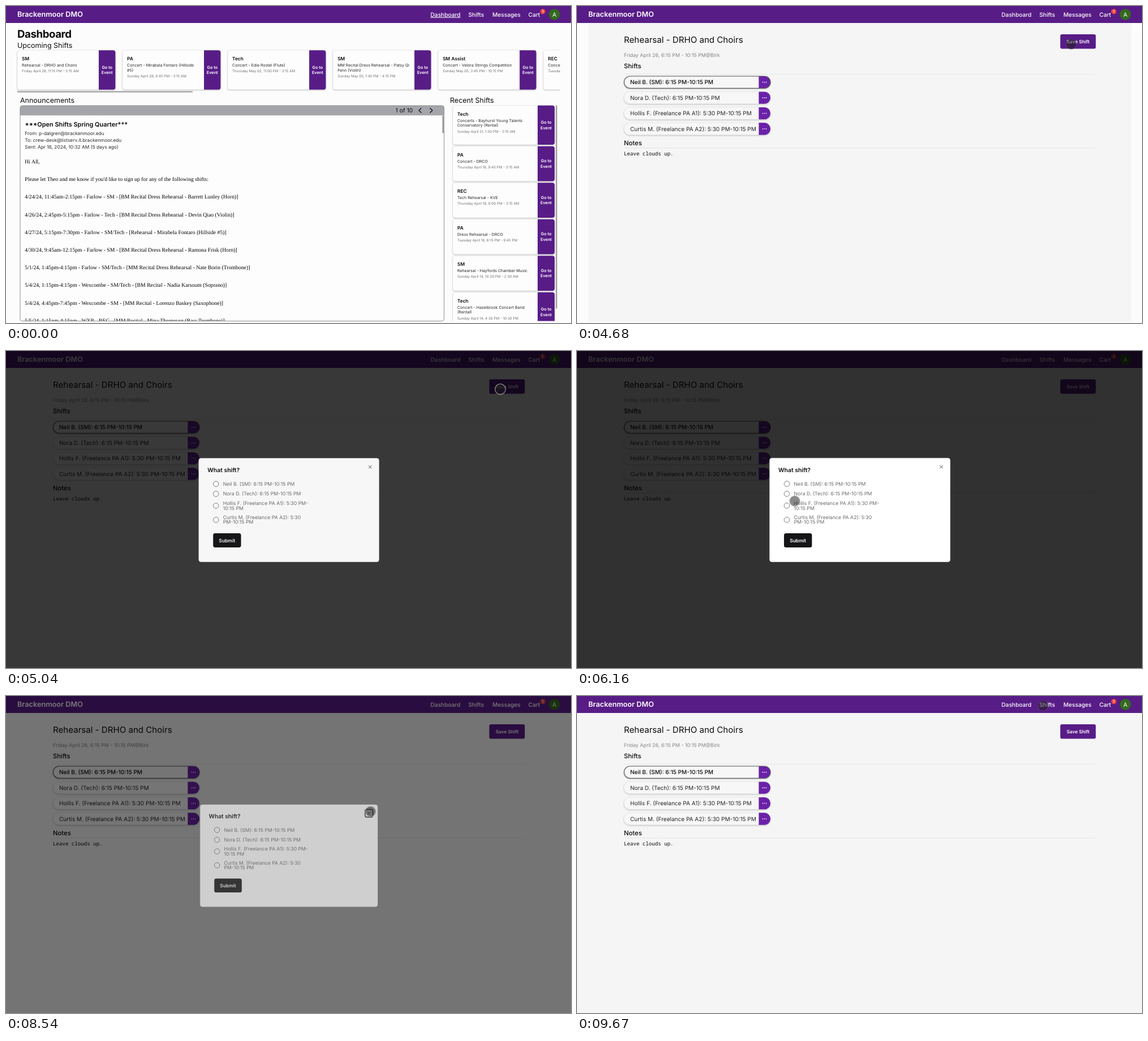
Write an HTML page that moves like this. It is 999 px wide and 560 px high and loops after 9690 ms.

```html
<!DOCTYPE html>
<html lang="en">
<head>
<meta charset="utf-8">
<title>Shift dashboard</title>
<style>
html, body { margin: 0; width: 100%; height: 100%; overflow: hidden; background: #fcfcfc; }
svg { display: block; width: 999px; height: 560px; }
text { font-family: Inter, Roboto, sans-serif; text-rendering: geometricPrecision; white-space: pre; }
.serif { font-family: "Liberation Serif", "Noto Serif", serif; }
.mono { font-family: "Noto Sans Mono", "DejaVu Sans Mono", monospace; }
.mid { text-anchor: middle; }
.under { text-decoration: underline; }
.card { fill: #fdfdfd; stroke: #e4e4e7; stroke-width: .6; filter: drop-shadow(0 1px 1px rgba(0,0,0,.24)); }
.pill { fill: #f7f7f7; stroke: #e2e2e4; stroke-width: .6; filter: drop-shadow(0 1px 1.2px rgba(0,0,0,.22)); }
</style>
</head>
<body>
<svg id="stage" viewBox="0 0 999 560" xmlns="http://www.w3.org/2000/svg"></svg>
<script>
const LOOP = 9690;
const PURPLE = '#581c87', INK = '#0c0c0f', GRAY = '#71717a';

// Drawing helpers
const text = (x, y, s, size, weight = 400, fill = INK, cls = '') =>
  `<text x="${x}" y="${y}" font-size="${size}" font-weight="${weight}" fill="${fill}" class="${cls}">${s}</text>`;
const rect = (x, y, w, h, fill, r = 0, extra = '') =>
  `<rect x="${x}" y="${y}" width="${w}" height="${h}" rx="${r}" fill="${fill}" ${extra}/>`;
const circle = (x, y, r, fill, extra = '') =>
  `<circle cx="${x}" cy="${y}" r="${r}" fill="${fill}" ${extra}/>`;
const line = (d, color, width) =>
  `<path d="${d}" fill="none" stroke="${color}" stroke-width="${width}" stroke-linecap="round" stroke-linejoin="round"/>`;
const rightTab = (x, y, w, h, r, fill) =>
  `<path d="M${x} ${y}h${w - r}a${r} ${r} 0 0 1 ${r} ${r}v${h - 2 * r}a${r} ${r} 0 0 1 ${-r} ${r}h${r - w}z" fill="${fill}"/>`;
const clip = (id, x, y, w, h, body) =>
  `<clipPath id="${id}">${rect(x, y, w, h, '#000')}</clipPath><g clip-path="url(#${id})">${body}</g>`;

function card(x, y, w, h, tab, [role, lines, when]) {
  const mid = y + h / 2, tx = x + w - tab / 2;
  const rows = lines.split('|');
  return `<rect class="card" x="${x}" y="${y}" width="${w}" height="${h}" rx="4"/>` +
    rightTab(x + w - tab, y, tab, h, 4, PURPLE) +
    text(x + 8, y + 17.8, role, 8.33, 600) +
    rows.map((s, i) => text(x + 8, y + 28.8 + 8.8 * i, s, 7, 400, '#27272a')).join('') +
    text(x + 8, y + 29.8 + 9 * rows.length, when, 6.24, 400, GRAY) +
    text(tx, mid - 2.2, 'Go to', 7.28, 600, '#fff', 'mid') +
    text(tx, mid + 7.3, 'Event', 7.28, 600, '#fff', 'mid');
}

const upcoming = [
  ['SM', 'Rehearsal - DRHO and Choirs', 'Friday April 26, 11:15 PM - 3:15 AM'],
  ['PA', 'Concert - Mirabela Fontaro (Hillside|#5)', 'Sunday April 28, 8:45 PM - 3:15 AM'],
  ['Tech', 'Concert - Edie Rostel (Flute)', 'Thursday May 02, 11:00 PM - 3:15 AM'],
  ['SM', 'MM Recital Dress Rehearsal - Patsy Qi|Fenn (Violin)', 'Sunday May 05, 1:45 PM - 4:15 PM'],
  ['SM Assist', 'Concert - Velora Strings Competition', 'Sunday May 05, 3:45 PM - 10:15 PM'],
  ['REC', 'Concert - Velora Strings', 'Tuesday May 07, 9:45 PM - 3:15 AM']
];
const recent = [
  ['Tech', 'Concerts - Bayhurst Young Talents|Conservatory (Rental)', 'Sunday April 21, 1:30 PM - 3:15 AM'],
  ['PA', 'Concert - DRCO', 'Thursday April 18, 9:45 PM - 3:15 AM'],
  ['REC', 'Tech Rehearsal - KVE', 'Thursday April 18, 9:00 PM - 3:15 AM'],
  ['PA', 'Dress Rehearsal - DRCO', 'Tuesday April 16, 6:15 PM - 9:45 PM'],
  ['SM', 'Rehearsal - Hayfords Chamber Music', 'Sunday April 14, 10:30 PM - 2:30 AM'],
  ['Tech', 'Concert - Hazelbrook Concert Band|(Rental)', 'Sunday April 14, 4:30 PM - 10:30 PM']
];
const mail = [
  'Hi All,',
  "Please let Theo and me know if you'd like to sign up for any of the following shifts:",
  '4/24/24, 11:45am-2:15pm - Farlow - SM - [BM Recital Dress Rehearsal - Barrett Lunley (Horn)]',
  '4/26/24, 2:45pm-5:15pm - Farlow - Tech - [BM Recital Dress Rehearsal - Devin Qiao (Violin)]',
  '4/27/24, 5:15pm-7:30pm - Farlow - SM/Tech - [Rehearsal - Mirabela Fontaro (Hillside #5)]',
  '4/30/24, 9:45am-12:15pm - Farlow - SM - [BM Recital Dress Rehearsal - Ramona Frisk (Horn)]',
  '5/1/24, 1:45pm-4:15pm - Farlow - SM/Tech - [MM Recital Dress Rehearsal - Nate Borin (Trombone)]',
  '5/4/24, 1:15pm-4:15pm - Wexcombe - SM/Tech - [BM Recital - Nadia Karsoum (Soprano)]',
  '5/4/24, 4:45pm-7:45pm - Wexcombe - SM - [MM Recital - Lorenzo Baskey (Saxophone)]',
  '5/5/24, 1:15pm-4:15pm - WXR - REC - [MM Recital - Mina Thorneson (Bass Trombone)]'
];
const crew = [
  'Neil B. (SM): 6:15 PM-10:15 PM',
  'Nora D. (Tech): 6:15 PM-10:15 PM',
  'Hollis F. (Freelance PA A1): 5:30 PM-10:15 PM',
  'Curtis M. (Freelance PA A2): 5:30 PM-10:15 PM'
];

function header() {
  return rect(0, 0, 999, 30, PURPLE) +
    text(20, 18.8, 'Brackenmoor DMO', 12.7, 600, '#fff') +
    `<g id="homeLink">${text(750.5, 18.8, 'Dashboard', 10.2, 500, '#fff')}</g>` +
    text(817.5, 18.8, 'Shifts', 10.2, 500, '#fff') +
    text(860, 18.8, 'Messages', 10.2, 500, '#fff') +
    text(923.5, 18.8, 'Cart', 10.2, 500, '#fff') +
    circle(949.2, 9.8, 4.6, '#ef4444') + text(949.2, 12.2, '1', 6.5, 600, '#fff', 'mid') +
    circle(969.6, 14.8, 9.9, '#33691e') + text(969.6, 18.6, 'A', 10.4, 400, '#fff', 'mid');
}

function dashboard() {
  let top = 175.7;
  const list = recent.map(r => {
    const h = r[1].includes('|') ? 69.2 : 61.6;
    const out = card(790, top, 180, h, 30, r);
    top += h + 2.9;
    return out;
  }).join('');
  return rect(0, 30, 999, 530, '#fcfcfc') +
    `<g letter-spacing="-.47">${text(20, 55.6, 'Dashboard', 18.73, 700)}</g>` +
    text(20, 73.7, 'Upcoming Shifts', 12.49) +
    clip('rowClip', 18, 76, 962, 74, upcoming.map((s, i) => card(20 + 186.05 * i, 78.2, 173.4, 69.6, 29.4, s)).join('')) +
    rect(20, 150.4, 310, 2.2, '#a0a0a0') +
    text(25, 171, 'Announcements', 12.49) + text(785, 171, 'Recent Shifts', 12.49) +
    rect(25, 176, 749.6, 380.6, '#fdfdfd', 4) +
    '<path d="M25 193.3v-13.3a4 4 0 0 1 4-4h741.6a4 4 0 0 1 4 4v13.3z" fill="#a4a4ab"/>' +
    rect(25, 176, 749.6, 380.6, 'none', 4, 'stroke="#85858a" stroke-width=".9"') +
    text(688.5, 188.1, '1 of 10', 10.4) +
    line('M734 180.7l-4 3.8 4 3.8M750 180.7l4 3.8-4 3.8', INK, 1.3) +
    rect(771.4, 193.5, 2.6, 31, '#a0a0a0') +
    text(33.5, 213, '***Open Shifts Spring Quarter***', 10.95, 600) +
    text(33.3, 227.5, 'From: p-dalgren@brackenmoor.edu', 8.33, 400, '#2c2c31') +
    text(33.3, 240, 'To: crew-desk@listserv.it.brackenmoor.edu', 8.33, 400, '#2c2c31') +
    text(33.3, 252.4, 'Sent: Apr 18, 2024, 10:32 AM (5 days ago)', 8.33, 400, '#2c2c31') +
    clip('mailClip', 26, 194, 745, 362, mail.map((s, i) => text(33.3, 278 + 31.2 * i, s, 9.71, 400, '#000', 'serif')).join('')) +
    clip('listClip', 785, 175, 195, 381.6, list) +
    rect(972, 175.5, 2.5, 359, '#a0a0a0');
}

function crewRow(s, i) {
  const y = 124 + 27.45 * i, h = 21.4;
  const dots = [-3, 0, 3].map(d => circle(331.5 + d, y + h / 2, .85, '#fff')).join('');
  return `<rect class="pill" x="83" y="${y}" width="259" height="${h}" rx="10.7"/>` +
    rightTab(321.4, y, 20.6, h, 10.5, '#6b21a8') + dots +
    (i ? '' : rect(83.3, y, 258.8, h, 'none', 10.7, 'stroke="#5c5c60" stroke-width="1.2"')) +
    text(94, y + 14.4, s, 10.05, i ? 400 : 500, i ? '#26262a' : INK);
}

function eventPage() {
  return rect(0, 30, 999, 530, '#f5f5f5') +
    `<g id="edges">${rect(0, 30, 20, 530, '#fcfcfc')}${rect(980, 30, 19, 530, '#fcfcfc')}${rect(0, 558, 999, 2, '#fcfcfc')}</g>` +
    text(83, 65.2, 'Rehearsal - DRHO and Choirs', 15.1) +
    text(83, 89.8, 'Friday April 26, 6:15 PM - 10:15 PM@Birk', 8.9, 400, '#85858a') +
    rect(854.5, 50, 62.8, 25.4, PURPLE, 3) +
    text(885.9, 65.9, 'Save Shift', 8.33, 600, '#fff', 'mid') +
    text(83, 110.2, 'Shifts', 11.3, 500) + rect(83, 119.9, 834, .9, '#e4e4e7') +
    crew.map(crewRow).join('') +
    text(83, 245.5, 'Notes', 11.3, 500) + rect(83, 250.3, 834, .9, '#e4e4e7') +
    text(83, 264.3, 'Leave clouds up.', 9.15, 400, INK, 'mono');
}

function dialog() {
  const radios = [234.6, 252.2, 273.2, 298.2];
  const labels = [
    [237.8, crew[0]], [255.3, crew[1]],
    [271.7, 'Hollis F. (Freelance PA A1): 5:30 PM-'], [280.5, '10:15 PM'],
    [296.9, 'Curtis M. (Freelance PA A2): 5:30'], [305.4, 'PM-10:15 PM']
  ];
  return rect(340.6, 189.2, 319.2, 183.3, '#fff', 4, 'stroke="#e4e4e7" stroke-width=".6"') +
    text(356, 213.9, 'What shift?', 10.4, 600) +
    line('M641.6 202.1l5 5m0-5l-5 5', '#505055', 1) +
    rect(637.2, 197.6, 14, 14, 'none', 3, 'id="ring" stroke="#18181b" stroke-width="1.5"') +
    radios.map(y => circle(371, y, 4.8, 'none', 'stroke="#6f6f74" stroke-width=".9"')).join('') +
    labels.map(([y, s]) => text(383.5, y, s, 8.75, 400, '#6b6b70')).join('') +
    rect(366, 322, 49.4, 25, '#151517', 3.5) +
    text(390.6, 337.7, 'Submit', 8.5, 600, '#fff', 'mid');
}

const $ = id => document.getElementById(id);
$('stage').innerHTML =
  `<g id="home">${dashboard()}</g><g id="event">${eventPage()}</g>${header()}` +
  `<rect id="shade" width="999" height="560"/><g id="dialog">${dialog()}</g>` +
  circle(0, 0, 9.3, 'rgba(30,30,30,.52)', 'id="dot" stroke="#c4c4c4" stroke-width="1.3"');

// Pointer moves: start, end, then [progress, x, y] stops
const moves = [
  [1120, 1720, [0, 512, 552], [.45, 375, 350], [1, 178, 121]],
  [3590, 4250, [0, 178, 121], [.5, 480, 94], [1, 815, 75]],
  [4500, 4680, [0, 815, 75], [1, 874, 67.5]],
  [5090, 5870, [0, 874, 67.5], [.5, 640, 180], [1, 405, 278]],
  [5920, 6160, [0, 405, 278], [1, 385, 265]],
  [6900, 7200, [0, 385, 265], [.5, 381, 300], [1, 386, 330]],
  [7570, 8050, [0, 386, 330], [.417, 640, 226], [.7, 651, 193], [1, 637, 206]],
  [8230, 8350, [0, 637, 206], [1, 644.5, 204]],
  [8710, 9490, [0, 644.5, 204], [.5, 738, 100], [1, 815, 14]],
  [9550, 9670, [0, 815, 14], [1, 824, 17]]
];
const TICK = 60;
const clamp = v => Math.max(0, Math.min(1, v));
const smooth = p => p * p * (3 - 2 * p);

function pointer(t) {
  const [start, end, ...stops] = moves.filter(m => t >= m[0]).pop() || moves[0];
  const steps = Math.round((end - start) / TICK) + 1;
  const p = smooth(clamp((Math.floor((t - start) / TICK) + 1) / steps));
  let i = 1;
  while (i < stops.length - 1 && p > stops[i][0]) i++;
  const [a, b] = [stops[i - 1], stops[i]];
  const k = (p - a[0]) / (b[0] - a[0]);
  return [a[1] + (b[1] - a[1]) * k, a[2] + (b[2] - a[2]) * k];
}

// CSS "ease" curve, solved by bisection
function ease(x) {
  if (x <= 0 || x >= 1) return clamp(x);
  let lo = 0, hi = 1, u;
  for (let i = 0; i < 20; i++) {
    u = (lo + hi) / 2;
    if (.75 * u * (1 - u) + u ** 3 < x) lo = u; else hi = u;
  }
  return .3 * u * (1 - u) ** 2 + 3 * u * u * (1 - u) + u ** 3;
}

function openness(t) {
  if (t < 4930) return 0;
  if (t < 8540) return ease((t - 4890) / 200);
  return 1 - ease((t - 8497) / 200);
}

const show = (id, on) => $(id).setAttribute('visibility', on ? 'visible' : 'hidden');

function draw(t) {
  const onEvent = t >= 2410, k = openness(t);
  $('home').style.display = onEvent ? 'none' : '';
  $('event').style.display = onEvent ? '' : 'none';
  $('edges').style.display = t < 4930 ? '' : 'none';
  $('homeLink').firstChild.setAttribute('class', onEvent ? '' : 'under');
  $('shade').setAttribute('opacity', .8 * k);
  $('dialog').setAttribute('opacity', k);
  $('dialog').setAttribute('transform',
    `translate(500.2 ${280.8 + 3.66 * (1 - k)}) scale(${.95 + .05 * k}) translate(-500.2 -280.8)`);
  show('ring', t >= 8540);
  show('dot', t >= 1180);
  const [x, y] = pointer(t);
  $('dot').setAttribute('transform', `translate(${x} ${y})`);
  $('dot').setAttribute('stroke-opacity', .12 + .58 * k);
}

const began = performance.now();
function tick() {
  draw((performance.now() - began) % LOOP);
  requestAnimationFrame(tick);
}
tick();
</script>
</body>
</html>
```
